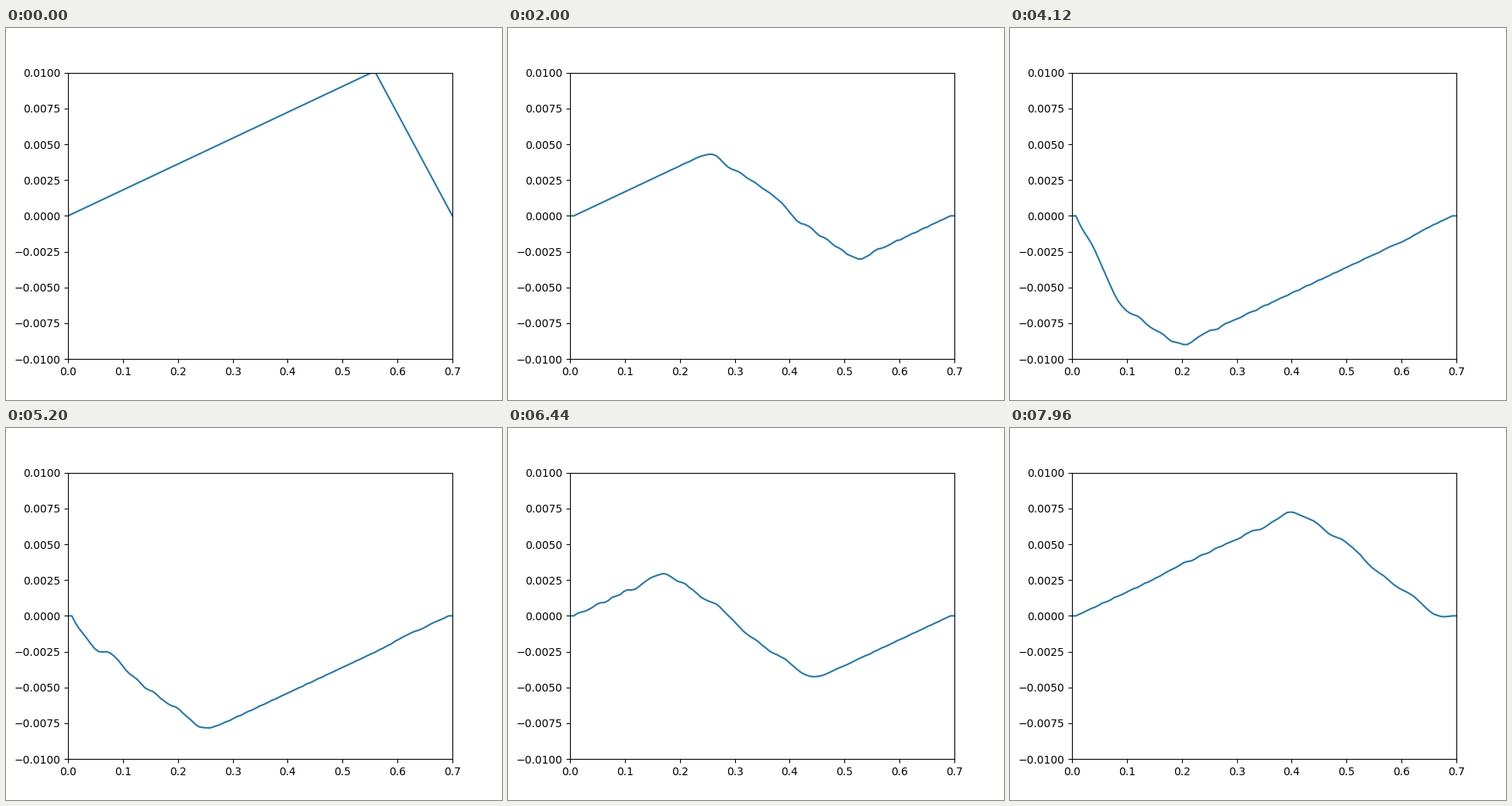
A matplotlib script for the animation above (8 s loop, 640x480 px).

```python
import numpy as np
import matplotlib.pyplot as plt
from matplotlib.animation import FuncAnimation

FRAMES = 200
INTERVAL = 40
STEPS_PER_FRAME = 2

# Plucked string: stiff, damped wave equation on a fixed grid
NODES = 101
LENGTH = 0.7
FREQ = 440
DX = LENGTH / (NODES - 1)
DT = 5e-6
SPEED = 2 * LENGTH * FREQ
STIFFNESS = 2e-5
DAMPING = 2.6e-5
HEIGHT = 0.01


def pluck():
    rise = np.linspace(0, HEIGHT, 80)
    fall = np.linspace(HEIGHT, 0, NODES - 80)
    return np.concatenate([rise, fall])


def simulate(steps):
    y = np.zeros((steps, NODES))
    y[0] = y[1] = pluck()
    inertia = 1 / (SPEED * DT) ** 2
    drag = DAMPING / (2 * DT)
    for t in range(1, steps - 1):
        now, before = y[t], y[t - 1]
        mid = now[2:-2]
        near = now[1:-3] + now[3:-1]
        far = now[:-4] + now[4:]
        tension = (near - 2 * mid) / DX**2
        bending = STIFFNESS**2 / DX**4 * (far - 4 * near + 6 * mid)
        past = inertia * (2 * mid - before[2:-2]) + drag * before[2:-2]
        y[t + 1, 2:-2] = (tension - bending + past) / (inertia + drag)
    return y


string = simulate(FRAMES * STEPS_PER_FRAME)
x = np.linspace(0, LENGTH, NODES)

fig, ax = plt.subplots(figsize=(6.4, 4.8), dpi=100)
line, = ax.plot(x, string[0])
ax.set_xlim(0, LENGTH)
ax.set_ylim(-HEIGHT, HEIGHT)


def update(frame):
    line.set_ydata(string[frame * STEPS_PER_FRAME])
    return line,


anim = FuncAnimation(fig, update, frames=FRAMES, interval=INTERVAL,
                     repeat=True, repeat_delay=0)
plt.show()
```
